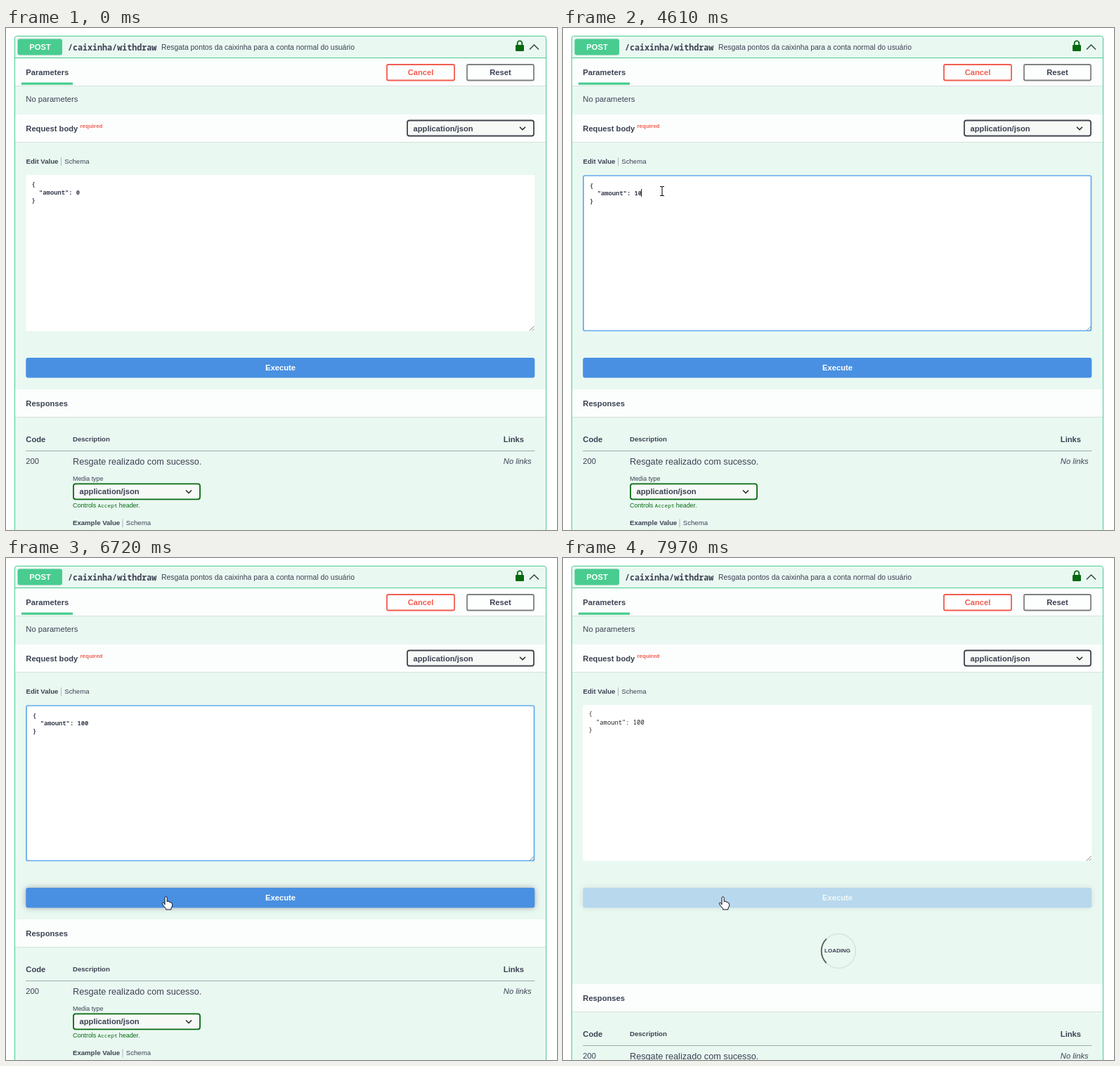
An HTML page for the animation above (8000 ms loop, 784 by 714 pixels).

```html
<!DOCTYPE html>
<html lang="pt">
<head>
<meta charset="utf-8">
<style>
html, body { margin: 0; width: 100%; height: 100%; overflow: hidden; background: #fff; }
svg { display: block; font: 11.2px "Liberation Sans", Arial, sans-serif; fill: #3b4151; }
text { white-space: pre; }
.b { font-weight: 700; }
.m { font-family: "Noto Sans Mono", "DejaVu Sans Mono", monospace; }
.mid { text-anchor: middle; }
.hover { filter: drop-shadow(0 0 4px rgba(0,0,0,.3)); }
</style>
</head>
<body>
<svg id="stage" width="784" height="714" viewBox="0 0 784 714"></svg>
<script>
const text = (x, y, s, size = 11.2, cls = '', more = '') =>
  `<text x="${x}" y="${y}" font-size="${size}" class="${cls}" ${more}>${s}</text>`;
const rect = (x, y, w, h, fill, more = '') =>
  `<rect x="${x}" y="${y}" width="${w}" height="${h}" fill="${fill}" ${more}/>`;
const line = (d, color, width = 1, more = '') =>
  `<path d="${d}" fill="none" stroke="${color}" stroke-width="${width}" ${more}/>`;
const band = (y, h) => rect(13, y, 755, h, '#fcfefd') +
  rect(13, y + h, 755, 1, 'rgba(0,0,0,.09)');
const button = (x, w, s, color, ink) =>
  rect(x + 1, 52, w - 2, 22.5, '#fdfefe', `rx="2" stroke="${color}" stroke-width="1.8"`) +
  text(x + w / 2, 66.5, s, 11.2, 'b mid', `fill="${ink}"`);
const select = (x, y, color) =>
  rect(x + 1, y + 1, 180, 22, '#f7f9f7', `rx="3" stroke="${color}" stroke-width="1.8"`) +
  text(x + 9.5, y + 16, 'application/json', 11.2, 'b') +
  line(`M${x + 161} ${y + 10.2}l4 4 4-4`, '#222', 1.5);
const tabs = (x, y, label, split) => text(x, y, label, 9.6, 'b') +
  rect(split, y - 8.5, 1, 12, 'rgba(59,65,81,.35)') + text(split + 5.3, y, 'Schema', 9.6);

const green = '#49cc90', dark = '#06690f', red = '#f25c50';
const stage = document.getElementById('stage');

stage.innerHTML =
  rect(12.5, 11.5, 756, 720, '#eaf8f2', `rx="3" stroke="${green}"`) +
  rect(13, 42, 755, 1, green) +
  rect(16.5, 15.5, 63.5, 23, green, 'rx="3"') +
  text(48.5, 31, 'POST', 11.2, 'b mid', 'fill="#fff"') +
  text(88, 31.5, '/caixinha/withdraw', 11.7, 'b m') +
  text(221, 31, 'Resgata pontos da caixinha para a conta normal do usuário', 10.4) +
  rect(725, 24, 12, 9, dark, 'rx="1.2"') +
  line('M727.7 25v-3.4a3.3 3.3 0 0 1 6.6 0v3.4', dark, 1.8) +
  line('M745 30.5l6.5-6.5 6.5 6.5', '#2c4a3c', 1.5) +
  band(43, 39) + text(28.3, 66.5, 'Parameters', 11.2, 'b') + rect(22, 77.5, 73, 3.3, green) +
  button(541, 98, 'Cancel', red, red) + button(655, 97, 'Reset', '#808080', '#3b4151') +
  text(28.3, 104.5, 'No parameters') +
  band(123, 39) + text(28.3, 146.5, 'Request body', 11.2, 'b') +
  text(105.5, 142, 'required', 8, 'b', `fill="${red}"`) +
  select(570, 130.5, '#41444e') +
  tabs(28.5, 192.5, 'Edit Value', 78) +
  rect(28.3, 209, 724, 222, '#fff', 'rx="2"') +
  line('M745 430.5l6.5-6.5M749 430.5l2.5-2.5', '#777') +
  `<g id="editor" class="m b" font-size="8.8">` +
    text(36.5, 225.3, '{', 8.8) +
    `<text id="amount" x="36.5" y="236.5"></text>` +
    text(36.5, 247.6, '}', 8.8) + `</g>` +
  rect(29, 210, 722.5, 220.5, 'none', 'id="focus" rx="2" stroke="#5fa9ea" stroke-width="1.7"') +
  rect(0, 229, 1, 11, '#222', 'id="caret"') +
  `<g id="execute">` + rect(28.3, 469, 724, 28.5, '#4990e2', 'rx="3"') +
    text(390.5, 487.3, 'Execute', 11.2, 'b mid', 'fill="#fff"') + `</g>` +
  `<g id="loading">` +
    `<circle cx="392" cy="559" r="24.3" fill="none" stroke="rgba(85,85,85,.1)" stroke-width="1.8"/>` +
    line('M374.8 541.8A24.3 24.3 0 0 1 409.2 541.8', 'rgba(0,0,0,.6)', 1.8, 'id="arc"') +
    text(390.5, 561.3, 'LOADING', 8, 'b mid') + `</g>` +
  `<g id="responses">` +
    band(514, 39) + text(28.3, 537.5, 'Responses', 11.2, 'b') +
    text(28.3, 588.7, 'Code', 11.2, 'b') + text(95, 588, 'Description', 9.6, 'b') +
    text(707.8, 588.7, 'Links', 11.2, 'b') + rect(28.3, 601, 724, 1, 'rgba(59,65,81,.42)') +
    text(28.3, 620, '200') + text(95, 620.5, 'Resgate realizado com sucesso.', 12.7) +
    text(707.8, 620, 'No links', 11.2, '', 'font-style="italic"') +
    text(95, 644.3, 'Media type', 8.9) + select(95, 647.3, dark) +
    text(95, 682.3, 'Controls', 8.96, '', `fill="${dark}"`) +
    text(130.5, 682.3, 'Accept', 7.8, 'm', `fill="${dark}"`) +
    text(160.7, 682.3, 'header.', 8.96, '', `fill="${dark}"`) +
    tabs(95, 707, 'Example Value', 165.5) + `</g>` +
  `<circle id="click" r="10" fill="rgba(255,250,0,.65)"/>` +
  `<g id="pointer">` +
    `<path id="arrow" d="M0 0V15l3.5-3.3 2.3 5.2 2.2-1-2.3-5H10.5z" fill="#fff" stroke="#111"/>` +
    `<path id="hand" d="M-2 11V1.5a1.6 1.6 0 0 1 3.2 0V7l1-.8 1.8.3.4.9 2 .1.5 1 1.4.4.3 1.3V13l-1.6 3v2H-.5v-1.4L-4 12.5-5.7 9.3l.8-1.2 1.6.5z" fill="#fff" stroke="#112"/>` +
    line('M-3-6.5h2q1 0 1 1 0-1 1-1h2M0-6V6M-3 6.5h2q1 0 1-1 0 1 1 1h2', '#111', 1.1, 'id="beam"') +
    `<g id="blocked"><circle r="6.6" fill="#fff"/>` +
      `<circle r="5" fill="none" stroke="#d01010" stroke-width="2"/>` +
      line('M-3.5-3.5l7 7', '#d01010', 2) + `</g></g>`;

const el = id => document.getElementById(id);
const show = (id, on) => { el(id).style.display = on ? '' : 'none'; };

// pointer path: time, x, y
const path = [
  [250, 672, 695], [383, 594, 525], [450, 558, 474], [517, 531, 399], [583, 526, 367.5],
  [850, 526, 367.5], [960, 505, 358], [1200, 325, 285], [1440, 140, 218], [1517, 127, 211],
  [1650, 141, 232], [5617, 141, 232], [5800, 142, 270], [5980, 149, 350], [6217, 172, 455],
  [6430, 225, 487], [6517, 230, 494], [6710, 228, 482]
];
// caret restarts with every edit
const edits = [[0, '0'], [1810, '0'], [3600, ''], [3930, '1'], [4280, '10'], [4890, '100']];
const LOAD = 7150;

function pointerAt(t) {
  const i = path.findIndex(p => p[0] > t);
  if (i < 0) return path[path.length - 1].slice(1);
  if (!i) return path[0].slice(1);
  const [a, b] = [path[i - 1], path[i]], k = (t - a[0]) / (b[0] - a[0]);
  return [a[1] + (b[1] - a[1]) * k, a[2] + (b[2] - a[2]) * k];
}

function draw(t) {
  const tick = 50 + Math.floor((t - 50) / 66.667) * 66.667; // pointer moves at 15 steps a second
  const [x, y] = pointerAt(tick);
  const loading = t >= LOAD, focused = t >= 1880 && t < 7080;
  const overButton = t >= 250 && y >= 469 && y <= 498;
  const shape = loading && t < 7900 ? 'blocked' : overButton ? 'hand' :
    y > 209 && y < 431 ? 'beam' : 'arrow';

  show('pointer', t >= 250);
  for (const id of ['arrow', 'hand', 'beam', 'blocked']) show(id, id === shape);
  const px = shape === 'blocked' ? x - 2 : x;
  el('pointer').setAttribute('transform', `translate(${px} ${y})`);
  show('click', t >= 1800 && t < 1940 || t >= 7010 && t < LOAD);
  el('click').setAttribute('transform', `translate(${x - 1} ${y - .5})`);

  const [since, value] = edits.filter(e => e[0] <= t).pop();
  el('amount').textContent = '  "amount": ' + value;
  el('editor').setAttribute('transform', focused ? 'translate(1.6 1.6)' : '');
  el('editor').setAttribute('class', loading ? 'm' : 'm b');
  el('editor').setAttribute('fill', loading ? '#222' : '#3b4151');
  show('focus', focused);
  show('caret', focused && value && Math.floor((t - since) / 530) % 2 === 0);
  el('caret').setAttribute('x', Math.round(100.1 + 5.3 * value.length));

  const k = Math.min(1, Math.max(0, (t - LOAD + 5) / 300));
  el('execute').setAttribute('opacity', 1 - .7 * k * k * (3 - 2 * k));
  el('execute').setAttribute('class', overButton ? 'hover' : '');
  show('loading', loading);
  el('arc').setAttribute('transform', `rotate(${12 + .3395 * (t - 7210)} 392 559)`);
  el('responses').setAttribute('transform', `translate(0 ${loading ? 92 : 0})`);
}

const start = performance.now();
function frame() {
  draw((performance.now() - start) % 8000);
  requestAnimationFrame(frame);
}
frame();
</script>
</body>
</html>
```
